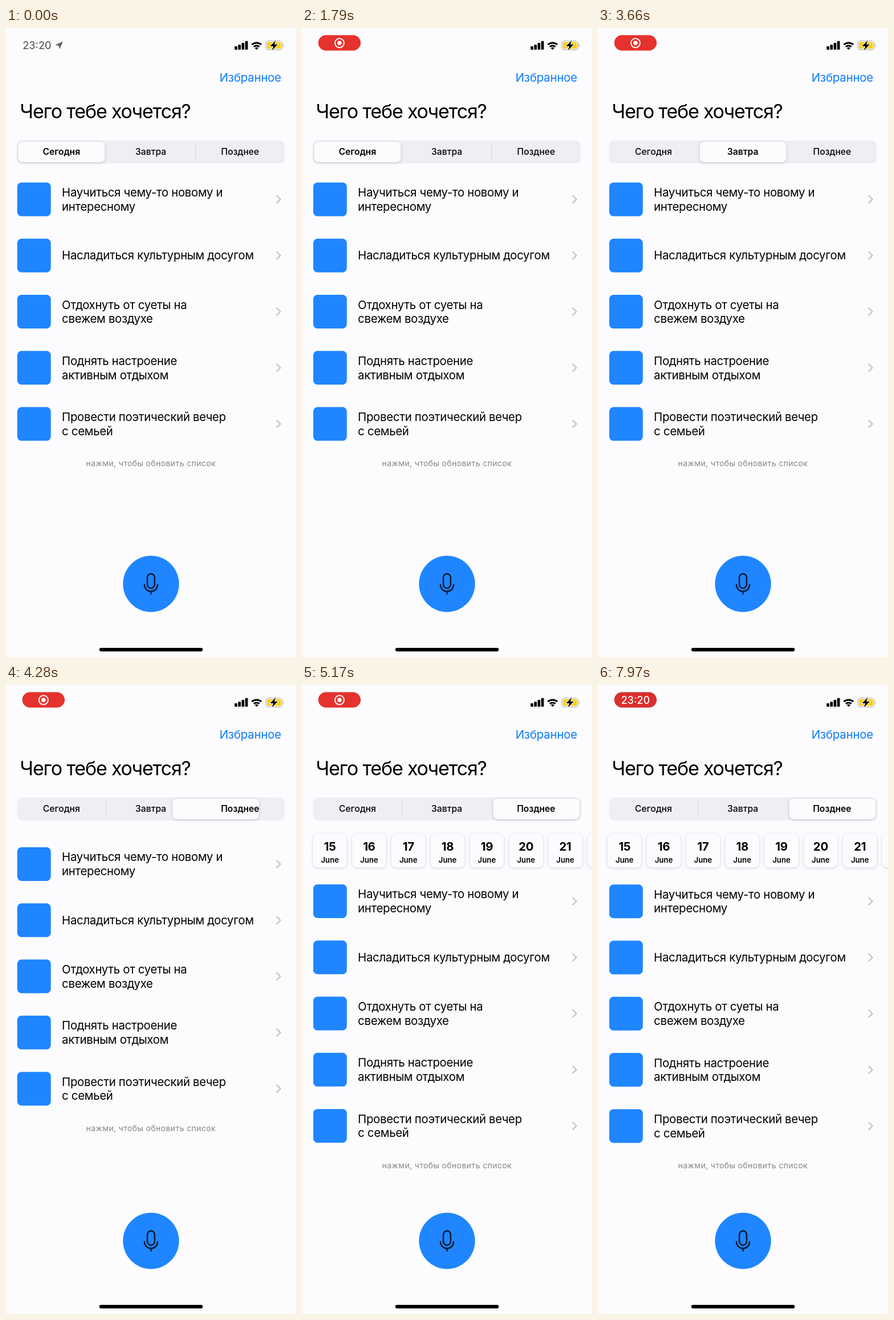
Recreate the animation shown at these times as an HTML page. Size 509 by 1101 pixels, loop 7990 ms.

```html
<!DOCTYPE html>
<html lang="ru">
<head>
<meta charset="utf-8">
<title>Чего тебе хочется?</title>
<style>
html, body { margin: 0; width: 100%; height: 100%; overflow: hidden; background: #fcfcfe; }
svg { display: block; width: 509px; height: 1101px; font-family: Inter, sans-serif; }
.title { font-size: 34px; letter-spacing: -1.18px; }
.link { font-size: 20.4px; letter-spacing: -.17px; fill: #0a7aff; }
.item { font-size: 20.4px; letter-spacing: -.31px; }
.hint { font-size: 14.2px; letter-spacing: .3px; fill: #87878b; }
.tab { font-size: 15.7px; font-weight: 500; }
.time { font-size: 18px; font-weight: 500; }
.day { font-size: 20.4px; font-weight: 700; letter-spacing: -.3px; }
.month { font-size: 13.2px; font-weight: 600; }
.mid { text-anchor: middle; }
.thumb { filter: drop-shadow(0 1.5px 2.5px rgba(0,0,0,.2)); }
.card { filter: drop-shadow(0 1px 2.5px rgba(70,40,110,.22)); }
</style>
</head>
<body>
<svg viewBox="0 0 509 1101">
  <rect width="509" height="1101" fill="#fcfcfe"/>

  <g id="clock" fill="#3a3a3c">
    <text class="time" x="29.2" y="37">23:20</text>
    <path d="M99 24.5 L87.5 29.6 L93 30.6 L94 36 Z" stroke="#3a3a3c" stroke-linejoin="round"/>
  </g>
  <g id="pill">
    <rect id="pillBg" x="28.5" y="12.5" width="74.5" height="27" rx="13.5"/>
    <g id="rec">
      <circle cx="65.8" cy="26.3" r="8" fill="none" stroke="#fff" stroke-width="1.9"/>
      <circle cx="65.8" cy="26.3" r="3.8" fill="#fff"/>
    </g>
    <text id="pillTime" class="time mid" x="65.8" y="32.8" fill="#fff">23:20</text>
  </g>

  <g id="bars"></g>
  <g fill="none" stroke="#000" stroke-width="3">
    <path d="M431.5 29.2 A12.2 12.2 0 0 1 448.1 29.2"/>
    <path d="M435 33 A7 7 0 0 1 444.6 33"/>
  </g>
  <path d="M439.8 38.2 L436.8 35.2 A4.3 4.3 0 0 1 442.8 35.2 Z"/>
  <rect x="456" y="22.8" width="28.6" height="15.4" rx="4.6" fill="#fcfcfe" stroke="#a3a3a6" stroke-width="1.1"/>
  <rect x="458" y="24.8" width="24.6" height="11.4" rx="2.8" fill="#fdcf0a"/>
  <path d="M486 28 Q488.4 30.5 486 33 Z" fill="#a3a3a6"/>
  <path d="M473.5 21.5 L463.5 32 H469.3 L466.7 39.5 L477 28.8 H471 Z" stroke="#fcfcfe" stroke-width="2" paint-order="stroke"/>

  <text class="link" x="374.8" y="93.6">Избранное</text>
  <text class="title" x="24.3" y="157.5">Чего тебе хочется?</text>

  <rect x="19.5" y="196.8" width="469.5" height="40.4" rx="9" fill="#f1eef3"/>
  <path id="sep1" d="M175.5 205 V229" stroke="#d7d5da" stroke-width="1.2"/>
  <path id="sep2" d="M332.5 205 V229" stroke="#d7d5da" stroke-width="1.2"/>
  <rect id="thumb" class="thumb" y="199" width="151.6" height="36" rx="7.5" fill="#fcfcfe"/>
  <g id="tabs"></g>

  <clipPath id="clip"><rect id="clipBox" y="250" width="509"/></clipPath>
  <g clip-path="url(#clip)"><g id="cards"></g></g>
  <g id="list"></g>

  <circle cx="254.5" cy="973" r="49.2" fill="#1f86ff"/>
  <g fill="none" stroke="#0c1a33" stroke-width="2.5" stroke-linecap="round">
    <rect x="248.1" y="955.5" width="12.8" height="25" rx="6.4"/>
    <path d="M243 974.5 A11.5 11.8 0 0 0 266 974.5 M254.5 986.4 V990.6"/>
  </g>
  <rect x="163.8" y="1085" width="181.6" height="6.2" rx="3.1"/>
</svg>
<script>
const LOOP = 7990, W = 9.2;
const $ = id => document.getElementById(id);
const clamp = v => Math.min(1, Math.max(0, v));
const mix = (a, b, k) => a + (b - a) * k;
const ramp = (t, a, b) => clamp((t - a) / (b - a));
const smooth = (t, a, b) => { const k = ramp(t, a, b); return k * k * (3 - 2 * k); };
// critically damped spring from 0 to 1
const spring = (t, start, w) => {
  const x = Math.max(0, t - start) / 1000 * w;
  return 1 - (1 + x) * Math.exp(-x);
};
const set = (id, attrs) => {
  for (const k in attrs) $(id).setAttribute(k, attrs[k]);
};

$('bars').innerHTML = [6, 8.8, 12, 15.2].map((h, i) =>
  `<rect x="${401.2 + i * 6.2}" y="${38 - h}" width="4.7" height="${h}" rx="1.2"/>`).join('');

$('tabs').innerHTML = ['Сегодня', 'Завтра', 'Позднее'].map((s, i) =>
  `<text class="tab mid" x="${97.3 + i * 156.8}" y="222.4">${s}</text>`).join('');

const items = [
  ['Научиться чему-то новому и', 'интересному'],
  ['Насладиться культурным досугом'],
  ['Отдохнуть от суеты на', 'свежем воздухе'],
  ['Поднять настроение', 'активным отдыхом'],
  ['Провести поэтический вечер', 'с семьей']
];
$('list').innerHTML = items.map((lines, i) => {
  const y = 299.9 + i * 98.3;
  const first = y + (lines.length > 1 ? -5 : 7.2);
  return `<rect x="19.7" y="${y - 29.5}" width="59" height="59" rx="7.5" fill="#1f86ff"/>` +
    lines.map((s, n) => `<text class="item" x="98.1" y="${first + n * 24.7}">${s}</text>`).join('') +
    `<path d="M475.3 ${y - 6.2} l6.4 6.2 l-6.4 6.2" fill="none" stroke="#c3c3c6" stroke-width="2.2" stroke-linecap="round" stroke-linejoin="round"/>`;
}).join('') + '<text class="hint mid" x="254.3" y="767.3">нажми, чтобы обновить список</text>';

$('cards').innerHTML = Array.from({ length: 8 }, (_, i) => {
  const x = 49 + i * 68.85;
  return `<rect class="card" x="${x - 29.7}" y="260.8" width="59.4" height="58.6" rx="8.5" fill="#fcfcfe"/>
    <text class="day mid" x="${x}" y="290.3">${15 + i}</text>
    <text class="month mid" x="${x}" y="310.8">June</text>`;
}).join('');

const tabs = $('tabs').children;

function draw(t) {
  // recording badge
  const grow = mix(.965, 1, smooth(t, 880, 1250));
  const heat = smooth(t, 900, 1600), cool = ramp(t, 6300, 7970);
  const rgb = [[255, 229, 217], [69, 50, 47], [63, 46, 46]]
    .map(([a, b, c]) => Math.round(mix(mix(a, b, heat), c, cool)));
  const swap = smooth(t, 5950, 6430);
  set('clock', { opacity: mix(.8, 0, smooth(t, 0, 260)) });
  set('pill', {
    opacity: smooth(t, 120, 480),
    transform: `translate(65.8 26) scale(${grow}) translate(-65.8 -26)`
  });
  set('pillBg', { fill: `rgb(${rgb})` });
  set('rec', { opacity: 1 - swap });
  set('pillTime', { opacity: swap });

  // tab selection
  const a = spring(t, 1965, W), b = spring(t, 4003, W);
  const active = t < 1965 ? 0 : t < 4003 ? 1 : 2;
  set('thumb', { x: 21.6 + 157.1 * (a + b) });
  set('sep1', { opacity: b });
  set('sep2', { opacity: 1 - a });
  for (let i = 0; i < 3; i++) tabs[i].style.fontWeight = i === active ? 600 : 500;

  // date strip opening
  const open = spring(t, 4190, 8.2), shift = 78.8 * open;
  set('list', { transform: `translate(0 ${shift})` });
  set('clipBox', { height: shift });
  const drag = ramp(t, 7850, 7970);
  set('cards', { opacity: open, transform: `translate(${-2.4 * drag * drag} 0)` });
}

function tick(now) {
  draw(now % LOOP);
  requestAnimationFrame(tick);
}
draw(0);
requestAnimationFrame(tick);
</script>
</body>
</html>
```
